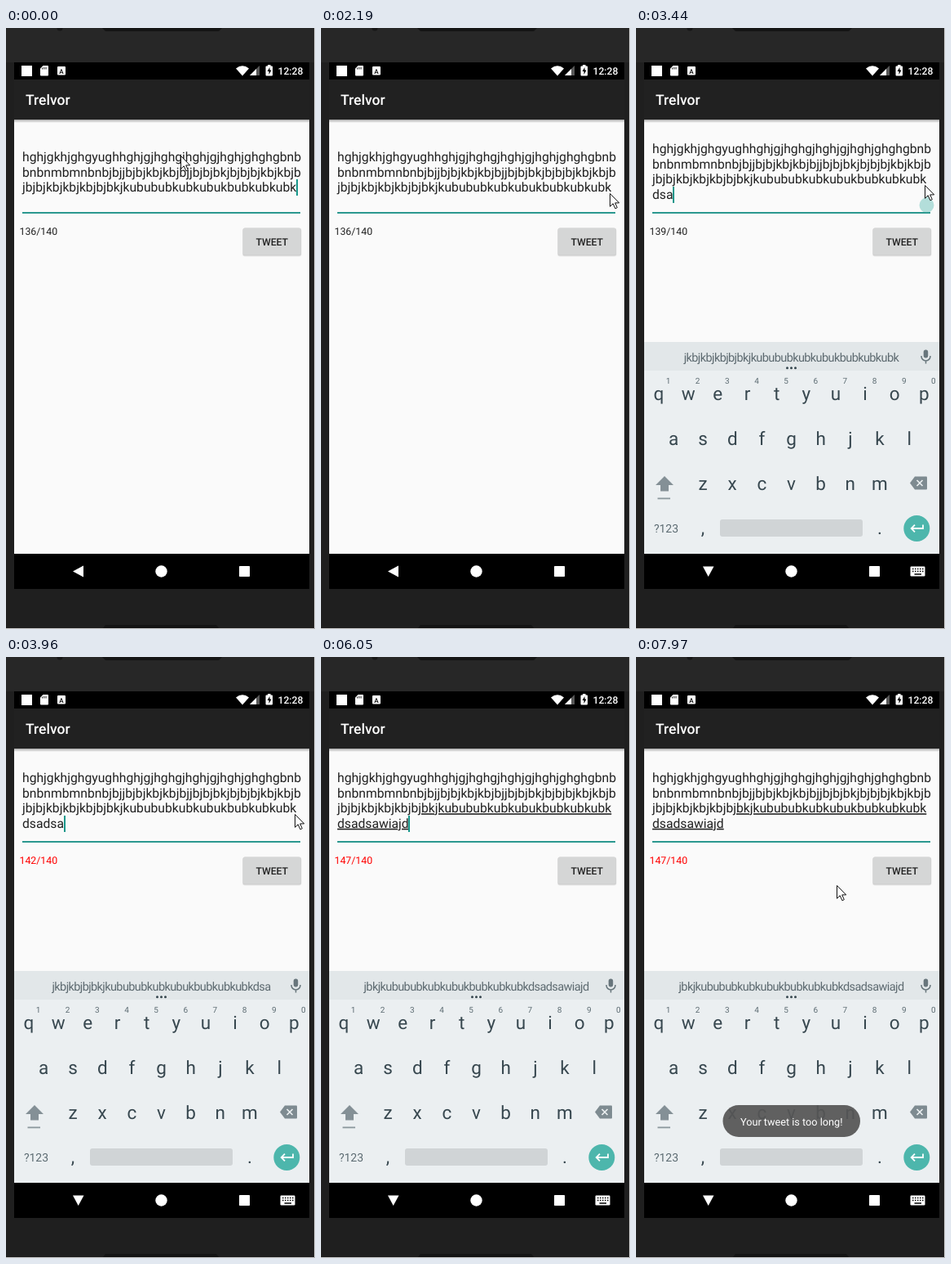
Write an HTML page that moves like this. It is 379 px wide and 735 px high and loops after 8 s.

```html
<!DOCTYPE html>
<html lang="en">
<head>
<meta charset="utf-8">
<title>Message composer</title>
<style>
  html, body { margin: 0; width: 100%; height: 100%; overflow: hidden; background: #1e1e1e; }
  svg { display: block; width: 379px; height: 735px; }
  text { font-family: Roboto, Arial, sans-serif; text-rendering: geometricPrecision; white-space: pre; }
  .mid { text-anchor: middle; }
  .bold { font-weight: 500; }
  .line { font-size: 15.7px; fill: #212121; }
  .under { text-decoration: underline 1px; text-underline-offset: 1.5px; text-decoration-skip-ink: none; }
</style>
</head>
<body>
<svg viewBox="0 0 379 735" xmlns="http://www.w3.org/2000/svg">
  <defs>
    <linearGradient id="drop" x2="0" y2="1">
      <stop stop-color="#000" stop-opacity=".32"/>
      <stop offset="1" stop-color="#000" stop-opacity="0"/>
    </linearGradient>
    <clipPath id="view"><rect x="10" y="112" width="362" height="532"/></clipPath>
  </defs>

  <!-- phone body -->
  <rect width="379" height="735" fill="#1f1f1f"/>
  <rect width="379" height="42" fill="#272727"/>
  <path d="M118 0H265L261 4H122Z" fill="#151515"/>
  <circle cx="66" cy="0" r="3.5" fill="#171717"/>
  <path d="M122 730H258L262 735H118Z" fill="#141414"/>
  <path d="M378.500 0V734.500H0" fill="none" stroke="#ccc"/>
  <rect x="10" y="42" width="362" height="644" fill="#fafafa"/>

  <!-- bars -->
  <rect x="10" y="42" width="362" height="21" fill="#000"/>
  <rect x="10" y="63" width="362" height="49" fill="#212121"/>
  <rect x="10" y="112" width="362" height="4" fill="url(#drop)"/>
  <g fill="#fff">
    <rect x="19" y="46" width="13" height="13"/>
    <path d="M45.500 46H51q1 0 1 1v10.500q0 1-1 1H43q-1 0-1-1V49.500Z"/>
    <rect x="63" y="47" width="10" height="10.500" rx="1"/>
    <path d="M282 49.500Q290 43 298 49.500L290 58.500Z"/>
    <path d="M311 46V58H299Z" opacity=".35"/>
    <path d="M307 50V58H299Z"/>
    <path d="M321 45h3.500v1.500H326q1 0 1 1V57.500q0 1-1 1H319.500q-1 0-1-1V47.500q0-1 1-1H321Z"/>
    <text class="bold" x="333.500" y="57" font-size="12.2">12:28</text>
    <text class="bold" x="24" y="94" font-size="17.500">Trelvor</text>
  </g>
  <text class="mid bold" x="68" y="55.500" font-size="8">A</text>
  <path d="M323.500 48L320.500 53H322.500V57L325.500 51.500H323.500Z"/>
  <path d="M44.500 48.500v2M46.700 48v2.500M49 48v2.500" stroke="#000" stroke-width=".9"/>

  <!-- form -->
  <g id="lines"></g>
  <rect x="20" y="225" width="341" height="2" fill="#2b988f"/>
  <rect id="caret" width="2" height="20" fill="#17978b"/>
  <path id="handle" d="M356.500 205L363 210.500A9 9 0 1 1 350 210.500Z" fill="#4db6ac"/>
  <text id="count" x="16.500" y="253" font-size="12.3"></text>
  <rect x="290" y="245" width="72.500" height="34.500" rx="3" opacity=".08"/>
  <rect x="290.500" y="244.500" width="71.500" height="34" rx="2.500" opacity=".1"/>
  <rect id="button" x="291" y="244.500" width="70.500" height="32.800" rx="2"/>
  <text class="mid bold" x="326.200" y="265.500" font-size="12.2" fill="#212121">TWEET</text>

  <!-- keyboard -->
  <g clip-path="url(#view)">
    <g id="board">
      <rect x="10" y="384" width="362" height="260" fill="#ebeff1"/>
      <rect x="10" y="384" width="362" height="35" fill="#e2e7e9"/>
      <text id="hint" class="mid" x="190.500" y="408" font-size="14.5" letter-spacing="-.6" fill="#5d6a70"></text>
      <path d="M185.500 415.700h.01M190.500 415.700h.01M195.500 415.700h.01" stroke="#37474f" stroke-width="3" stroke-linecap="round"/>
      <rect x="352.700" y="393.500" width="5.500" height="10" rx="2.700" fill="#68767c"/>
      <path d="M350 401v.5a5.500 5.500 0 0 0 11 0V401M355.500 407v3.500" fill="none" stroke="#68767c" stroke-width="1.500"/>
      <g id="keys"></g>
      <path d="M35 548L46 559H40V566.500H30V559H24Z" fill="#849096"/>
      <rect x="26.500" y="574.500" width="15.500" height="1.800" fill="#8b989d"/>
      <path d="M342 548.500H356q1 0 1 1V563.500q0 1-1 1H342L336 556.500Z" fill="#7e8b91"/>
      <path d="M344.500 553l7 7m0-7l-7 7" stroke="#ebeff1" stroke-width="1.700"/>
      <rect x="103" y="601" width="175" height="21" rx="3" fill="#d0d4d6"/>
      <circle cx="344.300" cy="612" r="16" fill="#4db6ac"/>
      <path d="M352 607.500V612H338M342 607.700L337.700 612L342 616.300" fill="none" stroke="#fff" stroke-width="1.800"/>
    </g>
    <g id="toast">
      <rect x="106.500" y="548" width="168.500" height="39" rx="19.500" fill="#555" opacity=".93"/>
      <text class="mid" x="190.700" y="572.700" font-size="12.700" fill="#fff">Your tweet is too long!</text>
    </g>
  </g>

  <!-- navigation -->
  <rect x="10" y="643" width="362" height="43"/>
  <g fill="#fff">
    <path id="back"/>
    <circle cx="190.500" cy="664.500" r="7.200"/>
    <rect x="286" y="658" width="13" height="13" rx=".7"/>
  </g>
  <g id="switch">
    <rect x="336.500" y="658.500" width="18" height="12" rx="1.200" fill="#fff"/>
    <path d="M339 661.500h13.500M339 664.500h13.500" stroke="#000" stroke-width="1.500" stroke-dasharray="1.500"/>
    <path d="M341.500 668h8.500" stroke="#000" stroke-width="1.500"/>
  </g>

  <path id="mouse" d="M.5.5V16.300L4.200 12.800L6.900 18.800L9.300 17.700L6.700 11.900H11.700Z" fill="#fff" stroke="#111"/>
</svg>
<script>
const LOOP = 8000, BLINK = 500, SETTLE = 140, LEAD = 18.5;
const TAP = 3140, PRESS = 6740, RELEASE = 7040;
const $ = id => document.getElementById(id);
const set = (id, name, value) => $(id).setAttribute(name, value);
const base = [
  "hghjgkhjghgyughhghjgjhghgjhghjgjhghjghghgbnb",
  "bnbnmbmnbnbjbjjbjbjkbjkbjbjjbjbjbkjbjbjbjkbjkbjb",
  "jbjbjkbjkbjkbjbjbkjkubububkubkubukbubkubkubk"
];

// Each edit restarts the caret blink; the word settles shortly after it.
const edits = [
  [-SETTLE - 380, ""], [TAP, ""], [3440, "dsa"], [3960, "dsadsa"],
  [4660, "dsadsaw"], [4780, "dsadsawia"], [4900, "dsadsawiajd"]
].map(([at, text]) => ({ at, text }));

// Pointer key points: time, x, y.
const path = [
  [0, 214, 156], [930, 214, 156], [1170, 209, 154], [1560, 237, 180], [2070, 352, 210],
  [2190, 354, 202], [3000, 354, 202], [TAP, 354, 192], [6049, 354, 192], [6050, 383, 180],
  [6200, 366, 203], [6470, 321, 257], [PRESS, 320, 263], [7580, 320, 263], [7850, 262, 280], [7970, 246, 279]
];

const ramp = (t, from, to) => Math.min(1, Math.max(0, (t - from) / (to - from)));

function pointer(t) {
  const i = path.findLastIndex(p => p[0] <= t);
  const a = path[i], b = path[i + 1] || a;
  const k = a === b ? 0 : ramp(t, a[0], b[0]);
  return [1, 2].map(n => a[n] + (b[n] - a[n]) * k);
}

function add(parent, tag, attrs, content = "") {
  const el = document.createElementNS("http://www.w3.org/2000/svg", tag);
  for (const k in attrs) el.setAttribute(k, attrs[k]);
  el.textContent = content;
  return parent.appendChild(el);
}

function keyRow(chars, x, y, size = 22.5, fill = "#37474f") {
  chars.forEach((c, i) =>
    add($("keys"), "text", { class: "mid", x: x + i * 36.15, y, "font-size": size, fill }, c));
}
keyRow([..."qwertyuiop"], 28, 454.5);
keyRow([..."asdfghjkl"], 46, 509.5);
keyRow([..."zxcvbnm"], 82, 565);
keyRow([..."1234567890"], 39.5, 434.7, 10, "#5c6b72");
keyRow(["?123"], 37, 617, 14, "#5c6b72");
keyRow([","], 82, 619);
keyRow(["."], 299, 619);

const rows = [...base, ""].map(() => {
  const el = add($("lines"), "text", { class: "line", x: 20 });
  return { el, plain: add(el, "tspan", {}), mark: add(el, "tspan", { class: "under" }) };
});

let shown;
function setText(word, under) {
  const state = word + under;
  if (state === shown) return;
  shown = state;
  const lines = [...base, word];
  const total = lines.join("").length;
  const from = under ? total - 40 : total;
  const last = word ? 3 : 2;
  const top = 181.5 - last * LEAD / 2 - (word ? .5 : 0);
  let start = 0;
  rows.forEach((row, i) => {
    const cut = Math.max(0, from - start);
    row.plain.textContent = lines[i].slice(0, cut);
    row.mark.textContent = lines[i].slice(cut);
    row.el.setAttribute("y", top + i * LEAD);
    start += lines[i].length;
  });
  set("caret", "x", Math.round(19.7 + rows[last].el.getComputedTextLength()));
  set("caret", "y", Math.round(top + last * LEAD - 14.9));
  $("count").textContent = total + "/140";
  set("count", "fill", total > 140 ? "#f00" : "#212121");
}

function draw(t) {
  const edit = edits.findLast(e => e.at <= t);
  const age = t - edit.at - SETTLE;
  const settled = edits.findLast((e, i) =>
    e.at + SETTLE <= Math.min(t, edits[i + 1]?.at ?? LOOP));
  setText(edit.text, edit.text !== "" && age >= 0);
  $("hint").textContent = (base.join("") + settled.text).slice(-40);
  set("caret", "opacity", 1 - Math.floor(Math.max(0, age) / BLINK) % 2);

  const open = t >= TAP;
  const slide = ramp(t, TAP + 20, 3440);
  set("handle", "opacity", open ? 1 - ramp(t, 3300, 3540) : 0);
  set("board", "opacity", slide);
  set("board", "transform", `translate(0 ${100 * (1 - slide) ** 2})`);
  set("switch", "opacity", +open);
  set("back", "d", open ? "M82 658.500H95.500L88.700 671Z" : "M95 657.500V671.500L82 664.500Z");

  set("button", "fill", t >= PRESS && t < RELEASE ? "#cbcccc" : "#d5d6d6");
  set("toast", "opacity", 1 - (1 - ramp(t, RELEASE, 7540)) ** 2);
  set("mouse", "transform", `translate(${pointer(t)})`);
}

const began = performance.now();
function tick() {
  draw((performance.now() - began) % LOOP);
  requestAnimationFrame(tick);
}
tick();
</script>
</body>
</html>
```
